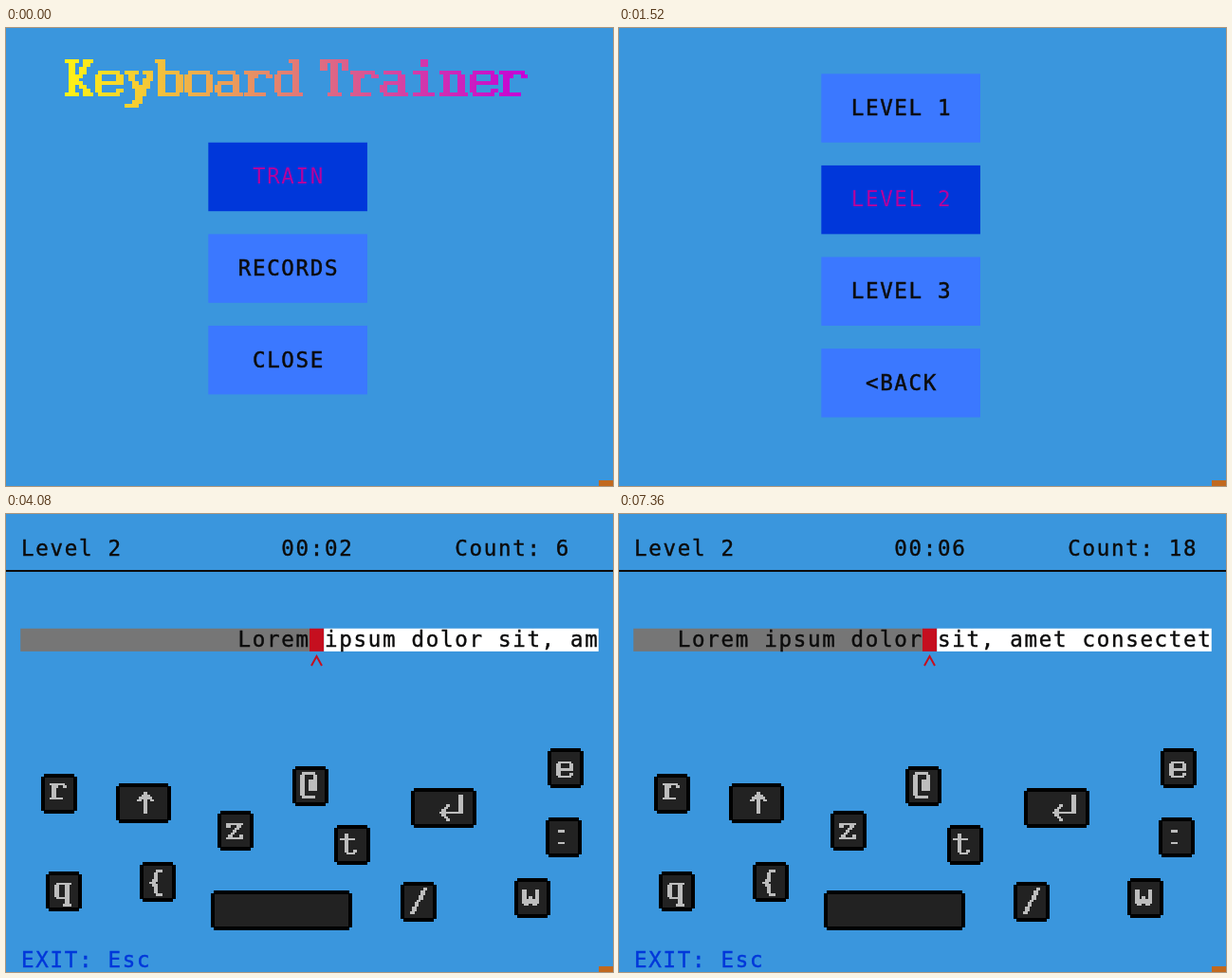
An HTML page that plays this animation: 640x483 px, repeating every 8000 ms.

```html
<!DOCTYPE html>
<html lang="en">
<head>
<meta charset="utf-8">
<title>Keyboard Trainer</title>
<style>
  html, body { margin: 0; width: 100%; height: 100%; overflow: hidden; background: #3a96dd; }
  svg { display: block; width: 640px; height: 483px; }
  text {
    font: 22.5px "DejaVu Sans Mono", "Noto Sans Mono", monospace;
    letter-spacing: 1.69px;
    fill: #0c0c0c;
  }
  .button rect { fill: #3b78ff; }
  .button.on rect { fill: #0037da; }
  .button text { stroke: #0c0c0c; stroke-width: .5; }
  .button.on text { fill: #b4009e; stroke: none; }
  .bold { stroke: #0c0c0c; stroke-width: .4; }
  .blue { fill: #0037da; stroke: #0037da; stroke-width: .4; }
  .pixels { shape-rendering: crispEdges; }
</style>
</head>
<body>
<svg id="stage" viewBox="0 0 640 483" role="img" aria-label="Keyboard Trainer"></svg>
<script>
const LOOP = 8000;
const CELL_W = 640 / 42, CELL_H = 483 / 20;
const PHRASE = 'Lorem ipsum dolor sit, amet consectetur';

// Times in ms at which the state changes
const MENU = [[0, 0], [480, 1], [640, 2], [720, 1], [800, 0]];
const LEVELS = [[1200, 0], [1520, 1], [1680, 2], [2000, 1]];
const LEVELS_AT = 1200, GAME_AT = 2400, SECOND = 800;
// The first press is Shift: it is counted but types nothing
const PRESSES = [2800, 3040, 3360, 3680, 3840, 3920, 4400, 4640, 4880,
  5360, 5680, 5840, 5920, 6240, 6400, 6640, 6800, 7200];

// Pen strokes of the bitmap lettering, baseline on row 9
const GLYPHS = {
  K: 'M0 0H2M1 0V9M0 9H2M5 0H6L2 5L6 9H5',
  T: 'M0 2V0H6V2M3 0V9M2 9H4',
  a: 'M1 3H4L5 4V9H6M5 6H1L0 7V8L1 9H4',
  b: 'M0 0H1V9M1 4L2 3H5L6 4V8L5 9H1',
  d: 'M4 0H5V9H6M5 3H1L0 4V8L1 9H4',
  e: 'M6 8L5 9H1L0 8V4L1 3H5L6 4V6H0',
  i: 'M3 0V1M1 3H3V9M1 9H5',
  n: 'M0 3H1V9M0 9H2M1 4L2 3H4L5 4V9M4 9H6',
  o: 'M1 3H5L6 4V8L5 9H1L0 8V4Z',
  q: 'M6 3H1L0 4V8L1 9H5M5 3V12M4 12H6',
  r: 'M0 3H1V9M0 9H4M1 5L3 3H5L6 4',
  t: 'M2 1V8L3 9H5L6 8M0 3H5',
  w: 'M0 3V7L1 9L3 6L5 9L6 7V3',
  y: 'M0 3H2M5 3H6M1 4L3 9M6 4L2 12H0',
  z: 'M0 4V3H6L0 9H6V8',
  '@': 'M5 10H1L0 9V1L1 0H5L6 1V7H4V3H6',
  '{': 'M5 0H4L3 1V4L1 5L3 6V9L4 10H5',
  '/': 'M6 0L0 10',
  ':': 'M3 4H4M3 9H4',
  '↑': 'M3 0V8M0 3L3 0L6 3',
  '↵': 'M9 0V7H0M3 4L0 7L3 10'
};

// label, key x, y, label offset x, y, key width
const KEYS = [
  ['r', 37, 274, 9, 2], ['↑', 116, 284, 22, 9, 58], ['z', 223, 313, 9, 5],
  ['@', 302, 266, 8, 6], ['t', 346, 328, 6, 6], ['↵', 427, 289, 30, 7, 69],
  ['e', 571, 247, 9, 6], [':', 569, 320, 6, 3], ['q', 42, 377, 9, 4],
  ['{', 141, 367, 8, 8], ['', 216, 397, 0, 0, 149], ['/', 416, 388, 10, 6],
  ['w', 536, 384, 8, 4]
];

const stage = document.getElementById('stage');

function add(parent, name, attrs = {}) {
  const node = document.createElementNS('http://www.w3.org/2000/svg', name);
  for (const key in attrs) node.setAttribute(key, attrs[key]);
  parent.append(node);
  return node;
}

const rect = (parent, x, y, width, height, fill) =>
  add(parent, 'rect', { x, y, width, height, ...(fill && { fill }) });

function setText(node, value) {
  const fixed = value.replace(/ /g, '\u00a0');
  if (node.textContent !== fixed) node.textContent = fixed;
}

function label(parent, col, row, value = '', cls = 'bold') {
  const node = add(parent, 'text', {
    x: col * CELL_W + .85, y: row * CELL_H + 19.4, class: cls
  });
  setText(node, value);
  return node;
}

// Rasterises a glyph on a small grid, smeared one pixel to the right
const pad = document.createElement('canvas');
pad.width = 12;
pad.height = 14;
const pen = pad.getContext('2d', { willReadFrequently: true });
pen.lineCap = 'square';

function glyphPath(char, x, y, w, h) {
  pen.clearRect(0, 0, pad.width, pad.height);
  const strokes = new Path2D(GLYPHS[char]);
  for (const shift of [.5, 1.5]) {
    pen.save();
    pen.translate(shift, .5);
    pen.stroke(strokes);
    pen.restore();
  }
  const data = pen.getImageData(0, 0, pad.width, pad.height).data;
  const edge = (origin, n, size) => Math.round(origin + n * size);
  let d = '';
  for (let r = 0; r < pad.height; r++) {
    for (let c = 0; c < pad.width; c++) {
      if (data[(r * pad.width + c) * 4 + 3] < 120) continue;
      d += `M${edge(x, c, w)} ${edge(y, r, h)}H${edge(x, c + 1, w)}` +
        `V${edge(y, r + 1, h)}H${edge(x, c, w)}Z`;
    }
  }
  return d;
}

function buttons(parent, firstRow, names) {
  return names.map((name, i) => {
    const row = firstRow + i * 4;
    const group = add(parent, 'g', { class: 'button' });
    rect(group, 14 * CELL_W, row * CELL_H, 11 * CELL_W, 3 * CELL_H);
    label(group, name.length > 5 ? 16 : 17, row + 1, name, '');
    return group;
  });
}

function drawTitle(parent) {
  const fade = add(parent, 'linearGradient', {
    id: 'fade', gradientUnits: 'userSpaceOnUse', x1: 62, x2: 550, y1: 0, y2: 0
  });
  add(fade, 'stop', { offset: 0, 'stop-color': '#fff314' });
  add(fade, 'stop', { offset: 1, 'stop-color': '#c400d8' });
  const word = (value, x) => [...value]
    .map((char, i) => glyphPath(char, x + i * 31.5, 33, 3.81, 3.9)).join('');
  add(parent, 'path', {
    class: 'pixels', fill: 'url(#fade)',
    d: word('Keyboard', 62) + word('Trainer', 331)
  });
}

function drawKey(parent, [char, x, y, dx, dy, w = 38]) {
  const h = 42;
  rect(parent, x + 3, y, w - 6, h, '#000');
  rect(parent, x, y + 3, w, h - 6, '#000');
  rect(parent, x + 4, y + 4, w - 8, h - 8, '#222');
  if (char) {
    add(parent, 'path', { fill: '#bdbdbd', d: glyphPath(char, x + dx, y + dy, 2.25, 2.5) });
  }
}

const menu = add(stage, 'g');
drawTitle(menu);
const menuButtons = buttons(menu, 5, ['TRAIN', 'RECORDS', 'CLOSE']);

const levels = add(stage, 'g');
const levelButtons = buttons(levels, 2, ['LEVEL 1', 'LEVEL 2', 'LEVEL 3', '<BACK']);

const game = add(stage, 'g');
label(game, 1, 1, 'Level 2');
const clock = label(game, 19, 1);
const count = label(game, 31, 1);
rect(game, 0, 59, 640, 2, '#0c0c0c');
rect(game, CELL_W, 5 * CELL_H, 20 * CELL_W, CELL_H, '#767676');
rect(game, 21 * CELL_W, 5 * CELL_H, CELL_W, CELL_H, '#c50f1f');
rect(game, 22 * CELL_W, 5 * CELL_H, 19 * CELL_W, CELL_H, '#fff');
const done = label(game, 1, 5);
const current = label(game, 21, 5, '', 'blue');
const ahead = label(game, 22, 5);
add(game, 'path', {
  d: 'M322 160L327.5 150L333 160', fill: 'none', stroke: '#c50f1f', 'stroke-width': 2
});
const board = add(game, 'g', { class: 'pixels' });
KEYS.forEach(key => drawKey(board, key));
label(game, 1, 19, 'EXIT: Esc', 'blue');

rect(stage, 625, 477, 15, 6, '#c1691f');

const show = (node, on) => node.setAttribute('display', on ? 'inline' : 'none');

function select(list, steps, t) {
  const step = steps.filter(([at]) => at <= t).pop();
  list.forEach((node, i) => node.classList.toggle('on', !!step && step[1] === i));
}

function render(t) {
  show(menu, t < LEVELS_AT);
  show(levels, t >= LEVELS_AT && t < GAME_AT);
  show(game, t >= GAME_AT);
  select(menuButtons, MENU, t);
  select(levelButtons, LEVELS, t);

  const presses = PRESSES.filter(at => at <= t).length;
  const typed = Math.max(0, presses - 1);
  const seconds = Math.max(0, Math.floor((t - GAME_AT) / SECOND));
  setText(clock, '00:' + String(seconds).padStart(2, '0'));
  setText(count, 'Count: ' + presses);
  setText(done, PHRASE.slice(0, typed).padStart(20));
  setText(current, PHRASE[typed]);
  setText(ahead, PHRASE.slice(typed + 1, typed + 20));
}

const start = performance.now();
function frame() {
  render((performance.now() - start) % LOOP);
  requestAnimationFrame(frame);
}
frame();
</script>
</body>
</html>
```
